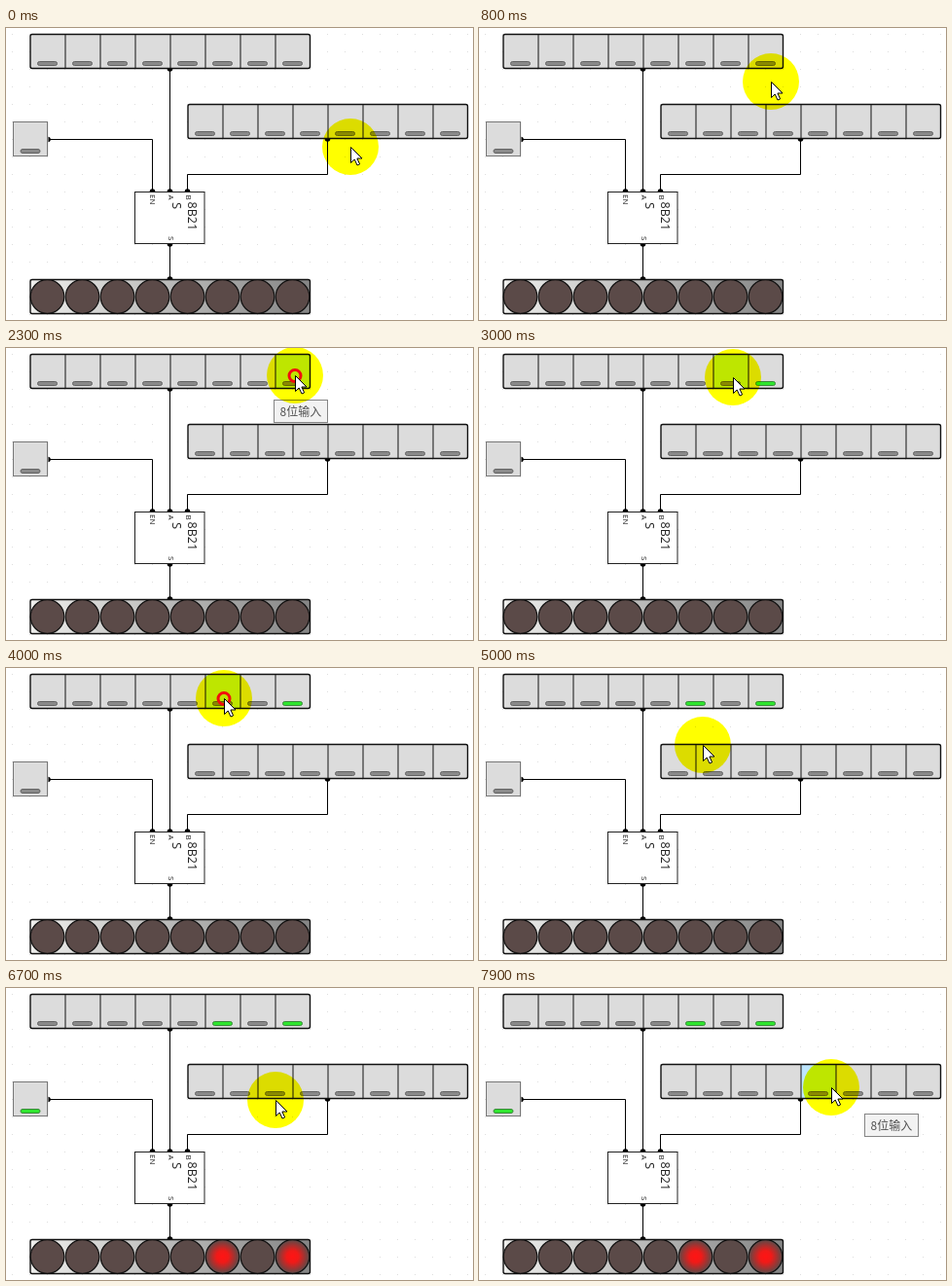
These frames come from a looping animation (480 by 300 pixels, 8 s). An HTML page:

```html
<!DOCTYPE html>
<html lang="zh">
<head>
<meta charset="utf-8">
<title>8-bit selector</title>
<style>
html, body { margin: 0; width: 100%; height: 100%; overflow: hidden; background: #fff; }
svg { display: block; width: 480px; height: 300px; }
.chip text { font-family: "Open Sans", "Noto Sans", sans-serif; fill: #222; }
.tip text { font: 12px "Noto Sans CJK SC", "Noto Sans CJK", sans-serif; fill: #505050; }
.wire { fill: none; stroke: #000; }
#halo { fill: #ff0; mix-blend-mode: multiply; }
</style>
</head>
<body>
<svg id="stage" viewBox="0 0 480 300">
  <defs>
    <pattern id="grid" x="6" y="6" width="18" height="18" patternUnits="userSpaceOnUse">
      <rect width="1" height="1" fill="#dedede"/>
    </pattern>
    <linearGradient id="tray">
      <stop offset="0" stop-color="#efefed"/>
      <stop offset="1" stop-color="#858585"/>
    </linearGradient>
    <radialGradient id="glow">
      <stop offset="0" stop-color="#ff1414"/>
      <stop offset=".35" stop-color="#f01a18"/>
      <stop offset="1" stop-color="#5b4a48"/>
    </radialGradient>
  </defs>
  <rect width="480" height="300" fill="#fff"/>
  <rect width="480" height="300" fill="url(#grid)"/>
  <g id="wires"></g>
  <g id="parts"></g>
  <g class="tip" id="tip">
    <rect x=".5" y=".5" width="55" height="23" fill="#f2f2f2" stroke="#858585"/>
    <text x="6.5" y="16.5">8位输入</text>
  </g>
  <g id="pointer">
    <circle id="halo" r="29"/>
    <circle id="ring" cy=".5" r="6" fill="none" stroke="#f20d0d" stroke-width="3"/>
    <path d="M.5 .5V16.5L4.2 13L7 19L9.6 17.9L6.9 12H12Z" fill="#fff" stroke="#000"/>
  </g>
</svg>
<script>
const LOOP = 8000, STEP = 100;
const $ = id => document.getElementById(id);

function add(parent, tag, attrs, text) {
  const el = document.createElementNS("http://www.w3.org/2000/svg", tag);
  for (const k in attrs) el.setAttribute(k, attrs[k]);
  if (text) el.textContent = text;
  parent.appendChild(el);
  return el;
}

const wires = $("wires"), parts = $("parts");
["M168.5 42V168", "M43 114.5H150.5V168", "M330.5 114V150.5H186.5V168", "M168.5 222V258"]
  .forEach(d => add(wires, "path", { d, class: "wire" }));
const pin = (cx, cy) => add(wires, "circle", { cx, cy, r: 2.8 });
[[168.5, 42], [43, 114.5], [150.5, 168], [168.5, 168], [186.5, 168], [168.5, 222], [168.5, 258]]
  .forEach(p => pin(...p));
const pinB = pin(330.5, 114);

// A row of push buttons, each with an indicator bar
function buttons(x, y, count, frame) {
  const cells = [];
  for (let i = 0; i < count; i++) {
    const cx = x + 36 * i;
    const face = add(parts, "rect", { x: cx, y, width: 36, height: 35 });
    if (i) add(parts, "path", { d: `M${cx} ${y}v35`, stroke: "#333", "stroke-width": 1.2 });
    const led = add(parts, "rect", { x: cx + 7.5, y: y + 28, width: 20, height: 4, rx: 2 });
    cells.push({ x: cx, y, face, led });
  }
  add(parts, "rect", { x, y, width: 36 * count - (count > 1 ? .5 : 1), height: 35, rx: count > 1 ? 2 : 0,
    fill: "none", stroke: frame, "stroke-width": count > 1 ? 1.4 : 1 });
  return cells;
}
const rowA = buttons(25, 6.5, 8, "#111");
const rowB = buttons(187, 78.5, 8, "#111");
const enable = buttons(7.5, 96.5, 1, "#777");
const keys = [...rowA, ...rowB, ...enable];

// Selector chip with sideways labels
const chip = add(parts, "g", { class: "chip" });
add(chip, "rect", { x: 132.5, y: 168.5, width: 71.5, height: 53, fill: "#fff", stroke: "#222" });
[["EN", 148, 171, 8], ["A", 166.5, 171.5, 8], ["B", 184.5, 171.5, 8], ["S", 166.5, 214, 8],
 ["S", 171, 179, 13], ["8B21", 186.5, 178.5, 12.5]].forEach(([s, x, y, size]) =>
  add(chip, "text", { transform: `translate(${x} ${y}) rotate(90)`, "font-size": size }, s));

// Output lamps
add(parts, "rect", { x: 25, y: 258.5, width: 287.5, height: 35, rx: 2,
  fill: "url(#tray)", stroke: "#111", "stroke-width": 1.4 });
const lamps = rowA.map((_, i) =>
  add(parts, "circle", { cx: 42.5 + 36 * i, cy: 276, r: 17.3, stroke: "#111", "stroke-width": 1.2 }));

const ease = {
  both: u => u * u * (3 - 2 * u),
  in: u => u * u,
  out: u => u * (2 - u),
};
// time, x, y, easing towards this point
const path = [
  [0, 354, 122], [1100, 288, 40, "both"], [1400, 290, 39, "both"], [2100, 297, 28, "both"],
  [2700, 297, 28, "both"], [3300, 224, 31, "both"], [4400, 224, 31, "both"],
  [5000, 230, 79, "in"], [5600, 25, 113, "out"], [6200, 25, 113, "both"],
  [6700, 277, 115, "in"], [7200, 388, 108, "out"], [7900, 362, 102, "both"], [8000, 362, 102, "both"],
];
const clicks = [
  { key: rowA[7], down: 2200, up: 2400 },
  { key: rowA[5], down: 4000, up: 4200 },
  { key: enable[0], down: 5800, up: 6000 },
];
const tips = [
  { from: 2000, to: 2500, x: 275, y: 53 },
  { from: 7600, to: LOOP, x: 396, y: 129 },
];

function pointAt(t) {
  const i = path.findIndex(p => p[0] > t);
  const [t0, x0, y0] = path[i - 1], [t1, x1, y1, kind] = path[i];
  const u = ease[kind]((t - t0) / (t1 - t0));
  return [x0 + (x1 - x0) * u, y0 + (y1 - y0) * u];
}

function draw(t) {
  const [x, y] = pointAt(t);
  const isOn = key => clicks.some(c => c.key === key && t >= c.up);
  for (const k of keys) {
    const hover = x >= k.x && x < k.x + 36 && y > k.y + 1 && y < k.y + 34;
    const on = isOn(k);
    k.face.setAttribute("fill", hover ? "#bee6fd" : "#dcdcdc");
    k.led.setAttribute("fill", on ? "#2fe62f" : "#8a8a8a");
    k.led.setAttribute("stroke", on ? "#3a8a3a" : "#636363");
  }
  lamps.forEach((lamp, i) =>
    lamp.setAttribute("fill", isOn(enable[0]) && isOn(rowA[i]) ? "url(#glow)" : "#5b4a48"));
  pinB.setAttribute("fill", t < 200 ? "#0000e0" : "#000");

  const tip = tips.find(p => t >= p.from && t < p.to);
  $("tip").style.display = tip ? "" : "none";
  if (tip) $("tip").setAttribute("transform", `translate(${tip.x} ${tip.y})`);

  // No transform on the pointer group, so the halo can blend with the stage
  const at = `translate(${Math.round(x)} ${Math.round(y)})`;
  for (const el of $("pointer").children) el.setAttribute("transform", at);
  $("ring").style.display = clicks.some(c => t >= c.down && t < c.up) ? "" : "none";
}

const start = performance.now();
function tick() {
  const t = (performance.now() - start) % LOOP;
  draw(Math.floor(t / STEP) * STEP);
  requestAnimationFrame(tick);
}
tick();
</script>
</body>
</html>
```
